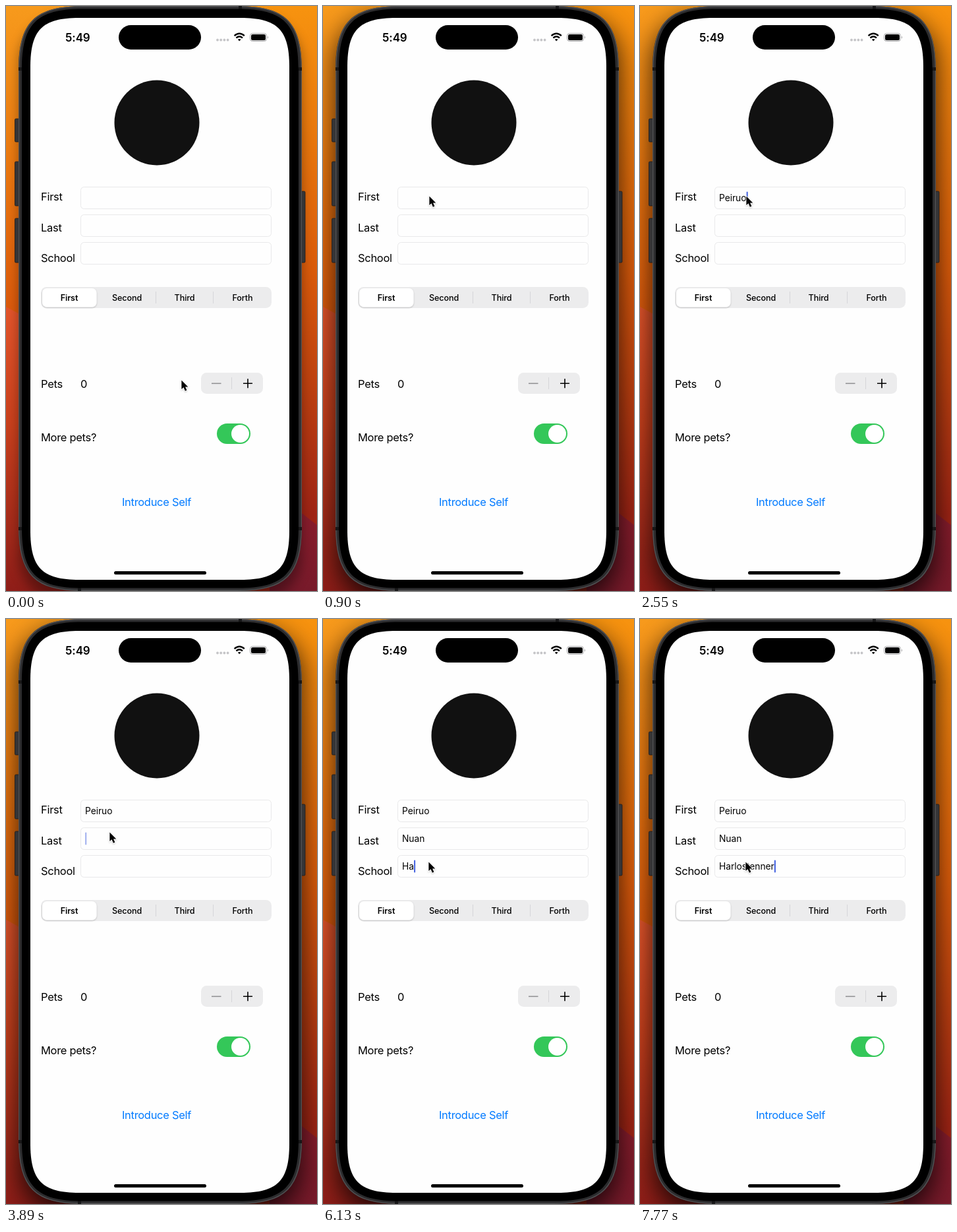
Write an HTML page that moves like this. It is 472 px wide and 887 px high and loops after 8 s.

```html
<!DOCTYPE html>
<html lang="en">
<head>
<meta charset="utf-8">
<title>Introduction form</title>
<style>
  html, body { margin: 0; width: 100%; height: 100%; overflow: hidden; background: #000; }
  svg { display: block; font-family: Inter, Roboto, sans-serif; }
  .label { font-size: 16.5px; letter-spacing: -.3px; }
  .value { font-size: 13.8px; letter-spacing: -.05px; }
  .segment { font-size: 12.6px; font-weight: 500; letter-spacing: -.1px; text-anchor: middle; }
  .field { fill: #fefefe; stroke: #e9e9ea; }
  .gray { fill: #ececed; }
  .rule { stroke: #d6d6d9; }
  .idle { filter: blur(9px); opacity: .35; }
  .active { filter: blur(19px); opacity: .75; }
</style>
</head>
<body>
<svg width="472" height="887" viewBox="0 0 472 887">
  <defs>
    <linearGradient id="left" x2="0" y2="1">
      <stop offset="0" stop-color="#f79a1c"/><stop offset=".3" stop-color="#ea750f"/>
      <stop offset=".52" stop-color="#dc5a0c"/>
    </linearGradient>
    <linearGradient id="leftHill" x2="0" y2="1">
      <stop offset="0" stop-color="#e4552b"/><stop offset=".4" stop-color="#cb411d"/>
      <stop offset="1" stop-color="#8e1d18"/>
    </linearGradient>
    <linearGradient id="right" x2="0" y2="1">
      <stop offset="0" stop-color="#f7930f"/><stop offset=".45" stop-color="#da5b0b"/>
      <stop offset=".87" stop-color="#9f2415"/>
    </linearGradient>
    <linearGradient id="rightHill" x2="0" y2="1">
      <stop offset="0" stop-color="#8f1e2d"/><stop offset="1" stop-color="#771a2a"/>
    </linearGradient>
    <filter id="soft" x="-50%" y="-50%" width="200%" height="200%">
      <feDropShadow dx="0" dy="1" stdDeviation="1" flood-opacity=".25"/>
    </filter>
  </defs>

  <!-- wallpaper -->
  <rect width="236" height="887" fill="url(#left)"/>
  <path d="M0 456L22 468L120 520V887H0Z" fill="url(#leftHill)"/>
  <rect x="236" width="236" height="887" fill="url(#right)"/>
  <path d="M400 732L449 769L472 787V887H400Z" fill="url(#rightHill)"/>
  <rect id="shadow" x="19" y="16" width="430" height="887" rx="70"/>

  <!-- phone -->
  <g fill="#353537" stroke="#1b1b1c" stroke-width=".8">
    <rect x="13.5" y="171" width="8" height="35" rx="1.5"/>
    <rect x="13.5" y="236" width="8" height="67" rx="1.5"/>
    <rect x="13.5" y="322" width="8" height="67" rx="1.5"/>
    <rect x="446" y="281" width="8" height="108" rx="1.5"/>
  </g>
  <path id="frame" fill="#2c2c2e"/>
  <path id="edge" fill="none" stroke="#515153" stroke-width="1.4"/>
  <path d="M353 0h5v5h-5zM109 882h5v5h-5zM19 93h5v5h-5zM444 93h5v5h-5zM19 790h5v5h-5zM444 790h5v5h-5z" fill="#171718"/>
  <path id="bezel"/>
  <path id="screen" fill="#fefefe"/>

  <!-- status bar -->
  <rect x="171" y="29" width="125" height="37" rx="18.5"/>
  <text x="90" y="53.5" font-size="17" font-weight="600" letter-spacing="-.1">5:49</text>
  <g fill="#c5c5c8">
    <circle cx="321" cy="51.5" r="1.9"/><circle cx="326.2" cy="51.5" r="1.9"/>
    <circle cx="331.4" cy="51.5" r="1.9"/><circle cx="336.6" cy="51.5" r="1.9"/>
  </g>
  <g fill="none" stroke="#000" stroke-width="2.3">
    <path d="M346.6 45.2Q354.2 38.4 361.8 45.2M349.4 48.4Q354.2 44.2 359 48.4"/>
    <path d="M354.2 53.2L351.8 50.8Q354.2 49 356.6 50.8Z" fill="#000" stroke="none"/>
  </g>
  <rect x="370.5" y="41.5" width="25" height="12" rx="3.8" fill="none" stroke="#a5a5a7"/>
  <rect x="372" y="43" width="22" height="9" rx="2.5"/>
  <path d="M397 45.5q2 2 0 4z" fill="#a5a5a7"/>

  <circle cx="229" cy="177" r="64.5" fill="#111"/>

  <!-- form -->
  <g class="label">
    <text x="53" y="295">First</text>
    <text x="53" y="342">Last</text>
    <text x="53" y="388">School</text>
    <text x="53" y="579">Pets</text>
    <text x="113" y="579">0</text>
    <text x="53" y="660">More pets?</text>
    <text x="228.5" y="757.5" fill="#007aff" text-anchor="middle">Introduce Self</text>
  </g>
  <rect class="field" x="113.5" y="274.5" width="289" height="33" rx="5"/>
  <rect class="field" x="113.5" y="316.5" width="289" height="33" rx="5"/>
  <rect class="field" x="113.5" y="358.5" width="289" height="33" rx="5"/>
  <g class="value">
    <text x="120" y="296"></text>
    <text x="120" y="338"></text>
    <text x="120" y="380"></text>
  </g>

  <rect class="gray" x="53" y="426" width="350" height="32" rx="8.5"/>
  <rect x="55" y="428" width="82.5" height="28.5" rx="7" fill="#fff" filter="url(#soft)"/>
  <path class="rule" d="M227.5 433v18M314.5 433v18"/>
  <g class="segment">
    <text x="96" y="446.7" style="font-weight:600">First</text>
    <text x="183.5" y="446.7">Second</text>
    <text x="271" y="446.7">Third</text>
    <text x="359" y="446.7">Forth</text>
  </g>

  <rect class="gray" x="296" y="556" width="94" height="32" rx="8.5"/>
  <path class="rule" d="M342.5 563v18"/>
  <path d="M312 572.3h14.5" stroke="#929295" stroke-width="1.6"/>
  <path d="M360 572.3h14M367 565.3v14" stroke="#000" stroke-width="1.6"/>

  <rect x="320" y="633" width="51" height="31" rx="15.5" fill="#34c759"/>
  <circle cx="355.5" cy="648.5" r="13.5" fill="#fff"/>
  <rect x="164" y="857" width="140" height="5" rx="2.5"/>

  <rect id="caret" width="2" height="19" rx="1" fill="#405fe0"/>
  <path id="pointer" d="M.4 .6V14L3.5 11.3L5.9 16.7L8.4 15.6L6.1 10.4H10.3Z" stroke="#fff" stroke-width="1.5" paint-order="stroke" filter="url(#soft)"/>
</svg>

<script>
const LOOP = 8000;
const ACTIVATE = 900; // the window gains focus and its shadow deepens
const find = id => document.getElementById(id);
const caret = find('caret'), pointer = find('pointer'), shadow = find('shadow');
const values = [...document.querySelectorAll('.value text')];

// Rounded box whose corners ease into the straight sides.
function smoothBox(id, x, y, w, h, r) {
  const e = 1.35 * r, c = .245 * e, k = e - c;
  find(id).setAttribute('d', `M${x + e} ${y}h${w - 2 * e}c${k} 0 ${e} ${c} ${e} ${e}
    v${h - 2 * e}c0 ${k} ${-c} ${e} ${-e} ${e}
    h${2 * e - w}c${-k} 0 ${-e} ${-c} ${-e} ${-e}
    v${2 * e - h}c0 ${-k} ${c} ${-e} ${e} ${-e}z`);
}
smoothBox('frame', 19, 0, 430, 887, 73);
smoothBox('edge', 19.7, .7, 428.6, 885.6, 72.3);
smoothBox('bezel', 24, 4.5, 420, 878, 68);
smoothBox('screen', 37, 18, 393, 852, 55);

// Per field: when it gains focus, and [time, letters shown] while typing.
const fields = [
  { word: 'Peiruo', focus: 1650, keys: [[1800, 1], [2100, 2], [2250, 3], [2400, 5], [2550, 6]] },
  { word: 'Nuan', focus: 3450, keys: [[4040, 1], [4340, 2], [4490, 3], [4630, 4]] },
  { word: 'Harlostenner', focus: 5380, keys: [[5980, 1], [6130, 2], [6430, 3], [6580, 4], [6730, 5],
    [6880, 6], [7020, 7], [7170, 8], [7470, 10], [7770, 12]] }
];

// Pointer stops: time, x, y
const stops = [
  [0, 266, 567], [150, 248, 520], [300, 208, 413], [450, 177, 330], [600, 164, 296], [750, 161, 288],
  [2850, 162, 308], [3000, 163, 350], [3150, 160, 336], [3300, 157, 323],
  [4930, 158, 334], [5080, 160, 358], [5230, 160, 368]
];

const fades = [3890, 5830];
const latest = (list, t) => list.filter(item => item[0] <= t).pop();

function draw(now) {
  const t = now % LOOP;
  shadow.setAttribute('class', t < ACTIVATE ? 'idle' : 'active');

  fields.forEach((field, i) => {
    const key = latest(field.keys, t);
    values[i].textContent = field.word.slice(0, key ? key[1] : 0);
  });

  const active = fields.filter(field => field.focus <= t).length - 1;
  if (active >= 0) {
    const text = values[active];
    const width = text.textContent ? text.getComputedTextLength() : 0;
    caret.setAttribute('x', 120.2 + width);
    caret.setAttribute('y', 281.5 + 42 * active);
  }
  const faded = fades.some(start => t >= start && t < start + 150);
  caret.setAttribute('opacity', active < 0 ? 0 : faded ? .5 : 1);

  const [, x, y] = latest(stops, t);
  pointer.setAttribute('transform', `translate(${x} ${y})`);
  requestAnimationFrame(() => draw(performance.now()));
}
draw(0);
</script>
</body>
</html>
```
